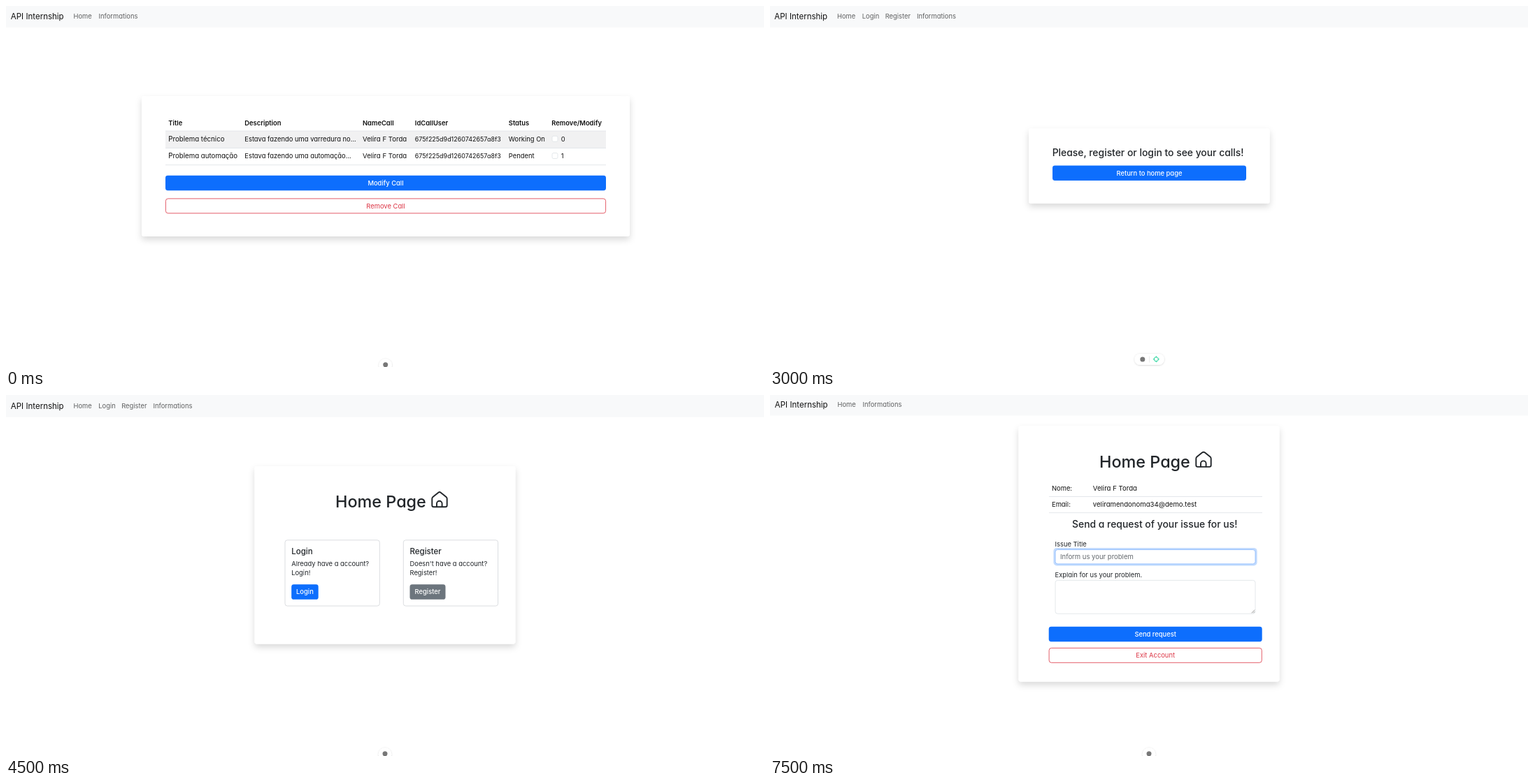
Animation of 1084 by 517 pixels, one loop 8 s. Source, as an HTML page:

```html
<!DOCTYPE html>
<html lang="en">
<head>
<meta charset="utf-8">
<title>Internship calls</title>
<style>
  html, body { margin: 0; width: 100%; height: 100%; overflow: hidden; background: #fff; }
  svg { display: block; width: 1084px; height: 517px; }
  /* cv11 gives the round, single-storey "a" */
  text {
    font-family: Inter, "Open Sans", sans-serif; font-feature-settings: "cv11";
    font-optical-sizing: none; white-space: pre;
  }
</style>
</head>
<body>
<svg id="stage" viewBox="0 0 1084 517" xmlns="http://www.w3.org/2000/svg"></svg>
<script>
const INK = '#212529', BLUE = '#0d6efd', RED = '#dc3545', GREY = '#6c757d', LINE = '#dee2e6';
const PERSON = 'Velira F Torda', EMAIL = 'veliramendonoma34@demo.test';

const rect = (x, y, w, h, fill, r = 0, more = '') =>
  `<rect x="${x}" y="${y}" width="${w}" height="${h}" rx="${r}" fill="${fill}" ${more}/>`;

const box = (x, y, w, h, stroke, r = 3.4, fill = '#fff', width = 0.8) =>
  rect(x, y, w, h, fill, r, `stroke="${stroke}" stroke-width="${width}"`);

const text = (x, y, words, { size = 9.4, fill = INK, weight = 400, anchor = 'start', more = '' } = {}) =>
  `<text x="${x}" y="${y}" font-size="${size}" fill="${fill}" font-weight="${weight}" text-anchor="${anchor}" ${more}>${words}</text>`;

const title = (x, y, words, size = 23.4) => text(x, y, words, { size, weight: 500 });
const rule = (x, y, w) => rect(x, y, w, 0.8, LINE);
const stroke = (d, color = INK, width = 1.9) =>
  `<path d="${d}" fill="none" stroke="${color}" stroke-width="${width}" stroke-linecap="round" stroke-linejoin="round"/>`;
const circle = (x, y, r, fill, more = '') => `<circle cx="${x}" cy="${y}" r="${r}" fill="${fill}" ${more}/>`;
const shift = (x, y, body) => `<g transform="translate(${x} ${y})">${body}</g>`;
const card = (x, y, w, h) => rect(x, y, w, h, '#fff', 3.4, 'filter="url(#cardShadow)"');

function button(x, y, w, words, fill = BLUE, h = 21.5) {
  return rect(x, y, w, h, fill, 3.4) +
    text(x + w / 2, y + h / 2 + 3.3, words, { fill: '#fff', weight: 500, anchor: 'middle' });
}

function outlineButton(x, y, w, words) {
  return box(x + 0.4, y + 0.4, w - 0.8, 20.9, RED, 3.4, '#fff', 0.8) +
    text(x + w / 2, y + 14, words, { fill: RED, anchor: 'middle' });
}

function navbar(height, y, signedIn, dx = 0) {
  const links = signedIn
    ? [[96.5, 'Home'], [132.5, 'Informations']]
    : [[96.5, 'Home'], [132.3, 'Login'], [165.2, 'Register'], [210.5, 'Informations']];
  return rect(0, 0, 1084, height, '#f8f9fa') +
    text(6.8 + dx, y + 1, 'API Internship', { size: 11.5, fill: '#111' }) +
    links.map(([x, words]) => text(x + dx, y, words, { fill: '#5f6061' })).join('');
}

const badge = (x = 542, y = 514.5) =>
  circle(x, y, 9.3, '#fff', 'filter="url(#badgeShadow)"') + circle(x, y - 0.8, 3.5, '#777');

const userIcon = circle(617, 144.3, 5.3, 'none', `stroke="${INK}" stroke-width="1.9"`) +
  stroke('M609 160.7V159.5A8.2 8 0 0 1 625.3 159.5V160.7');
const houseIcon = stroke('M609.3 148.6Q609.3 147 610.5 146L618.3 139.7Q620 138.4 621.7 139.7L629.5 146Q630.7 147 630.7 148.6V158Q630.7 160.3 628.4 160.3H611.6Q609.3 160.3 609.3 158Z') +
  stroke('M616 160V155.6A3.8 3.8 0 0 1 623.6 155.6V160');
const noteIcon = stroke('M624 102.4H615.5Q612.8 102.4 612.8 105V121.4Q612.8 124 615.5 124H627L634.2 117V111M627 124V119Q627 117 629 117H634') +
  stroke('M619 117.3L619.8 112.6L629.5 103Q631.3 101.4 633.2 103.2Q635 105 633.3 106.9L623.6 116.5Z', INK, 1.7);

function callsPage() {
  const cols = [232.3, 341.3, 510, 584.8, 718.8, 780.3];
  const heads = ['Title', 'Description', 'NameCall', 'IdCallUser', 'Status', 'Remove/Modify'];
  const sizes = [9.7, 9.4, 9.6, 8.95, 9.4];
  const calls = [
    ['Problema técnico', 'Estava fazendo uma varredura no...', 'Working On'],
    ['Problema automação', 'Estava fazendo uma automação...', 'Pendent'],
  ];
  const row = ([name, about, status], i) => {
    const y = 193.6 + i * 24.3;
    return [name, about, PERSON, '675f225d9d1260742657a8f3', status]
      .map((words, c) => text(cols[c], y, words, { size: sizes[c], fill: '#111' })).join('') +
      box(781, y - 7.4, 8, 8, LINE, 2) + text(793.7, y, i, { fill: '#111' });
  };
  return navbar(30.7, 18.3, true) + card(194, 129, 698, 201) +
    rect(228, 179, 630, 24, '#f1f1f2') +
    [178.6, 203, 227.3].map(y => rule(228, y, 630)).join('') +
    heads.map((words, c) => text(cols[c], 170.6, words, { weight: 600, fill: '#111' })).join('') +
    calls.map(row).join('') +
    button(228, 242.7, 630, 'Modify Call') +
    outlineButton(228, 275.5, 630, 'Remove Call') + badge(542.7);
}

function loginPage() {
  const dots = Array.from({ length: 9 }, (_, i) => circle(480.9 + i * 3.72, 248, 1.2, '#111')).join('');
  return navbar(30.7, 18.3, false) + card(355.5, 102, 373, 253.5) +
    title(473.7, 161, 'Login page') + userIcon +
    text(474.7, 190, 'Insert your email:') +
    box(475.2, 194.2, 152, 20.8, '#767676', 1, '#e8f0fe') +
    text(478.7, 207.6, EMAIL, { size: 9.6, fill: '#111', more: 'clip-path="url(#field)"' }) +
    text(474.7, 233.7, 'Insert your password:') +
    box(475.2, 237.8, 152, 20.8, '#767676', 1) + dots +
    text(477.8, 285.7, 'Not registered yet?', { size: 9.5 }) +
    text(565, 285.7, 'Register here', { fill: BLUE, more: 'text-decoration="underline"' }) +
    button(474.7, 298.3, 152.6, 'Login') + badge();
}

function lockedPage() {
  const target = circle(552.3, 505.8, 3.1, 'none', 'stroke="#2fd6a0" stroke-width="1"') +
    stroke('M552.3 501.7V503.4M552.3 508.2V509.9M548.2 505.8H549.9M554.7 505.8H556.4', '#2fd6a0', 1);
  return navbar(30.7, 18.3, false, -0.5) + card(370, 175.5, 344.7, 107.2) +
    title(403.7, 215, 'Please, register or login to see your calls!', 13.9) +
    button(404, 228.5, 277, 'Return to home page') +
    rect(521.3, 498, 42.5, 16, '#fff', 8, 'filter="url(#badgeShadow)"') +
    circle(532.8, 506, 3.5, '#777') + rect(542.3, 501.5, 0.7, 9, '#e3e3e3') + target;
}

function choice(x, name, question, fill, width) {
  return box(x, 207.8, 135.3, 94.3, '#d7dadd', 3.4, '#fff', 0.9) +
    title(x + 9.2, 227.8, name, 11.5) +
    text(x + 9.2, 244.8, question) + text(x + 9.2, 258.3, name + '!') +
    button(x + 9.2, 271.3, width, name, fill);
}

function homePage() {
  return navbar(31.7, 18.9, false) + card(355.5, 102, 373, 254.5) +
    title(471, 161, 'Home Page') + houseIcon +
    choice(399, 'Login', 'Already have a account?', BLUE, 38.5) +
    choice(568.3, 'Register', "Doesn't have a account?", GREY, 51) + badge();
}

function registerPage() {
  const under = navbar(30.2, 18.3, false) + card(355.5, 65.7, 373, 327) +
    title(449.7, 124.3, 'Register Page') + noteIcon +
    text(465.7, 153.2, 'Insert a name:') +
    box(466.1, 157.3, 152, 21, RED, 3, '#fff', 1) +
    text(469.3, 170.2, 'Name', { fill: GREY }) +
    circle(607.5, 167.5, 3.9, 'none', `stroke="${RED}" stroke-width="1"`) + stroke('M607.5 165.3V168', RED, 1) +
    button(502.5, 344, 79.5, 'Register');
  const dialog = rect(407, 168.3, 270, 181.4, '#fff', 3) +
    circle(542, 211.3, 23.9, 'none', 'stroke="#f27474" stroke-width="2.3"') +
    stroke('M533.6 202.6L550.8 219.8M550.8 202.6L533.6 219.8', '#f27474', 2.8) +
    text(542, 271.3, 'Oops!', { size: 14.6, fill: '#595959', weight: 600, anchor: 'middle' }) +
    text(542, 295, 'Please, fill in the fields correctly.', { size: 9.2, fill: '#636363', anchor: 'middle' }) +
    rect(625.2, 315.2, 41.6, 25.6, '#c2d7e5', 4) + rect(626.3, 316.3, 39.4, 23.4, '#fff', 3.4) +
    rect(627, 317, 38, 22, '#7cd1f9', 2.8) +
    text(646, 330.7, 'OK', { size: 8.2, fill: '#fff', weight: 600, anchor: 'middle' });
  return under + rect(0, 0, 1084, 517, '#000', 0, 'fill-opacity=".4"') + dialog + badge();
}

function accountPage() {
  return navbar(29.5, 17.3, true) + card(355.5, 44.5, 373, 366) +
    title(471, 103.6, 'Home Page') + shift(0, -57.4, houseIcon) +
    text(403, 136.8, 'Nome:', { fill: '#111' }) + text(461.8, 136.8, PERSON, { size: 9.6, fill: '#111' }) +
    text(403, 160, 'Email:', { fill: '#111' }) + text(461.8, 160, EMAIL, { size: 9.6, fill: '#111' }) +
    rule(399, 145.2, 305) + rule(399, 168.3, 305) +
    title(432, 190.4, 'Send a request of your issue for us!', 13.9) +
    text(407.5, 217, 'Issue Title') +
    rect(405.4, 218.9, 291.2, 25.6, '#c2dbfe', 4.8) + box(408, 221.5, 286, 20.4, '#86b7fe') +
    text(415, 234.8, 'Inform us your problem', { size: 9.5, fill: '#62676c' }) +
    text(407.5, 261.3, 'Explain for us your problem.') +
    box(408, 265.4, 286, 47.8, LINE) + stroke('M689 312L693 308M691.3 312L693 310.3', '#777', 0.7) +
    button(398.7, 331.7, 305, 'Send request') +
    outlineButton(398.7, 362, 305, 'Exit Account') + badge();
}

const defs = `<defs>
  <filter id="cardShadow" x="-10%" y="-20%" width="120%" height="150%">
    <feDropShadow dx="0" dy="4.6" stdDeviation="4.6" flood-color="#000" flood-opacity=".15"/></filter>
  <filter id="badgeShadow" x="-40%" y="-40%" width="180%" height="180%">
    <feDropShadow dx="0" dy="0.5" stdDeviation="1.2" flood-color="#000" flood-opacity=".2"/></filter>
  <clipPath id="field"><rect x="478" y="195" width="145.3" height="19"/></clipPath>
</defs>`;

const pages = [callsPage, loginPage, lockedPage, homePage, registerPage, accountPage];
const PAGE_MS = 1500, LOOP_MS = 8000;
const stage = document.getElementById('stage');
stage.innerHTML = defs + pages.map(page => `<g class="page">${page()}</g>`).join('');
const groups = [...stage.querySelectorAll('.page')];

function draw(ms) {
  const current = Math.floor((ms % LOOP_MS) / PAGE_MS);
  groups.forEach((group, i) => { group.style.display = i === current ? '' : 'none'; });
}

const start = performance.now();
function tick() {
  draw(performance.now() - start);
  requestAnimationFrame(tick);
}
tick();
</script>
</body>
</html>
```
